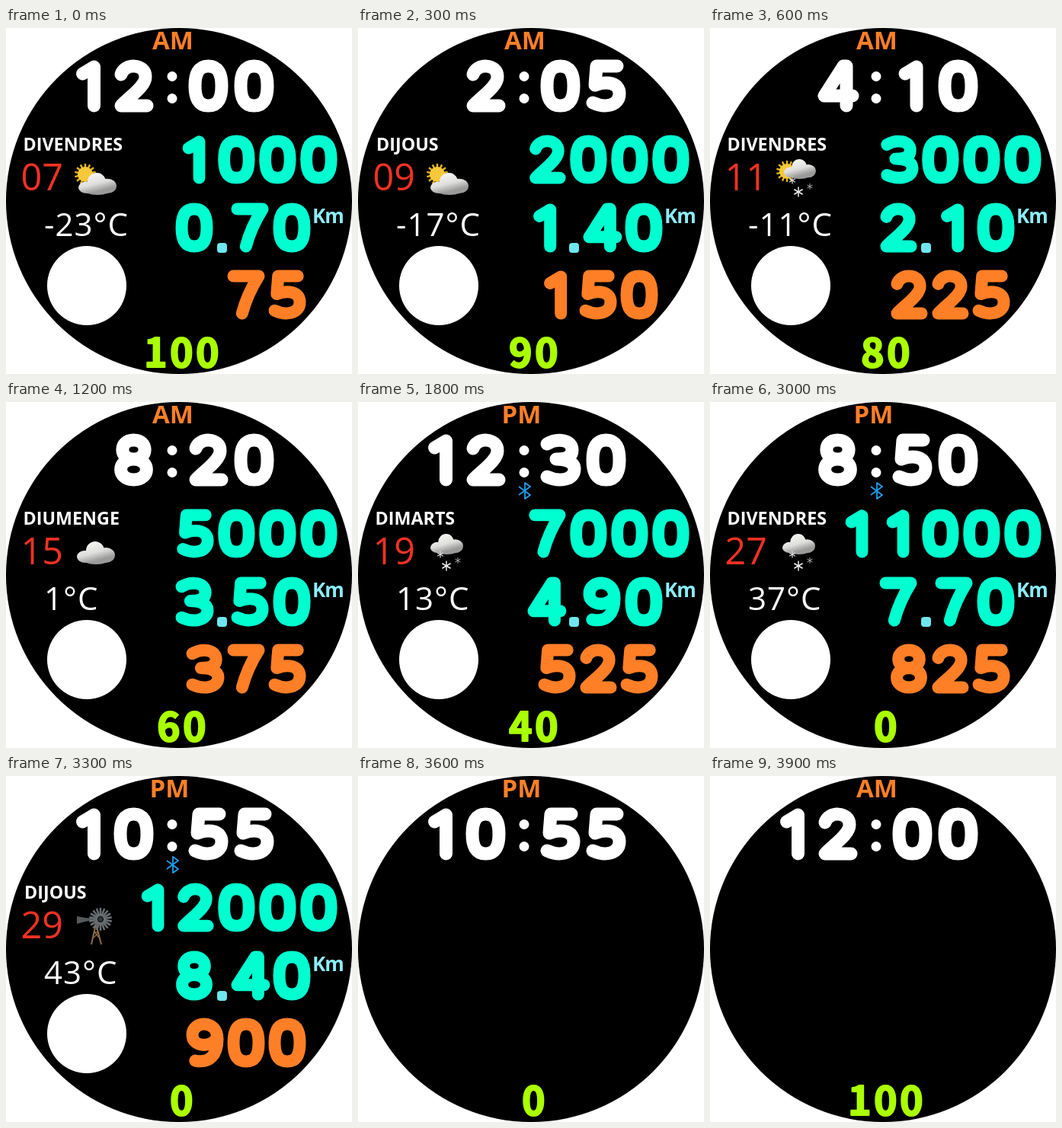
An HTML page with a canvas for the animation above (4200 ms loop, 454 px wide and 454 px high).

```html
<!DOCTYPE html>
<html lang="ca">
<head>
<meta charset="utf-8">
<title>Watch face</title>
<style>
html, body { margin: 0; height: 100%; overflow: hidden; background: #fff; }
canvas { display: block; width: 100vw; height: 100vh; }
</style>
</head>
<body>
<canvas id="face" width="454" height="454"></canvas>
<script>
const c = document.getElementById('face').getContext('2d');
const STEP = 300, COUNT = 14;
const TEAL = '#00ffd0', ORANGE = '#ff7f27', LIME = '#aaff00', ICE = '#8cecf5';

// Centre lines of the round digits in a 53 x 70 box
const digits = [
  'M26.5 9C13 9 9 20 9 35S13 61 26.5 61S44 50 44 35S40 9 26.5 9Z',
  'M17 19L32 10V61',
  'M10 20C14 5 42 5 42 23C42 36 22 48 10 61H44',
  'M9 14C22 6 42 8 42 22C42 32 32 34 21 34C32 34 45 37 45 47C45 62 24 64 9 57',
  'M38 61V9H34L9 48H46',
  'M41 9H14L12 34C28 28 44 31 44 45C44 62 24 64 9 57',
  'M40 10C20 6 9 18 9 40C9 68 44 66 44 46C44 28 16 28 10 42',
  'M9 9H44C34 25 26 42 21 61',
  'M26.5 34C7 34 7 9 26.5 9S46 34 26.5 34C4 34 4 61 26.5 61S49 34 26.5 34Z',
  'M13 60C33 64 44 52 44 30C44 2 9 4 9 24C9 42 37 42 43 28'
].map(d => new Path2D(d));

const days = ['DIVENDRES', 'DIJOUS', 'DIVENDRES', 'DISSABTE', 'DIUMENGE', 'DILLUNS',
  'DIMARTS', 'DIMECRES', 'DIVENDRES', 'DIVENDRES', 'DIVENDRES', 'DIJOUS'];

function digit(d, x, y, h, color) {
  c.save();
  c.translate(x, y);
  c.scale(h / 70, h / 70);
  c.strokeStyle = color;
  c.lineWidth = 17;
  c.lineCap = c.lineJoin = 'round';
  c.stroke(digits[d]);
  c.restore();
}

function number(value, right, y, h, pitch, color) {
  const s = String(value), w = h * 53 / 70;
  [...s].forEach((d, i) => digit(d, right - w - (s.length - 1 - i) * pitch, y, h, color));
}

function text(s, x, y, size, weight, color, spacing = 0, family = 'Open Sans') {
  c.font = `${weight} ${size}px "${family}", sans-serif`;
  c.letterSpacing = spacing + 'px';
  c.fillStyle = color;
  c.fillText(s, x, y);
}

function disc(x, y, r, color) {
  c.fillStyle = color;
  c.beginPath();
  c.arc(x, y, r, 0, 7);
  c.fill();
}

function line(color, width, ...points) {
  c.strokeStyle = color;
  c.lineWidth = width;
  c.beginPath();
  points.forEach(p => c.lineTo(...p));
  c.stroke();
}

// n lines running outwards from a centre
function spokes(x, y, r0, r1, n, color, width) {
  for (let i = 0; i < n; i++) {
    const a = (i + 0.5) * 2 * Math.PI / n, u = Math.cos(a), v = Math.sin(a);
    line(color, width, [x + r0 * u, y + r0 * v], [x + r1 * u, y + r1 * v]);
  }
}

function sun(x, y) {
  spokes(x, y, 8, 14, 14, '#e6b422', 2.4);
  disc(x, y, 10, '#f7c93a');
}

function cloud(x, y, w, h) {
  c.save();
  c.translate(x, y);
  c.scale(w / 50, h / 30);
  const g = c.createLinearGradient(0, 0, 8, 30);
  g.addColorStop(0, '#fff');
  g.addColorStop(0.65, '#dededc');
  g.addColorStop(1, '#9a9a98');
  c.fillStyle = g;
  c.beginPath();
  for (const [cx, cy, rx, ry] of [[11, 20, 11, 8], [24, 12, 12, 12], [38, 18, 12, 10], [25, 22, 19, 8]]) {
    c.moveTo(cx + rx, cy);
    c.ellipse(cx, cy, rx, ry, 0, 0, 2 * Math.PI);
  }
  c.fill();
  c.restore();
}

function snow() {
  spokes(108, 200, 0, 4.5, 6, '#ddd', 1.2);
  spokes(116, 215, 0, 6.5, 6, '#eee', 1.5);
  spokes(131, 208, 0, 4, 6, '#aaa', 1);
}

function windmill() {
  line('#8a6a4a', 2, [112, 221], [118, 194], [125, 221]);
  line('#8a6a4a', 1.3, [114, 213], [122, 205], [116, 205], [124, 214]);
  c.fillStyle = '#55595c';
  c.beginPath();
  for (const p of [[93, 184], [104, 186], [121, 188], [104, 191], [93, 194]]) c.lineTo(...p);
  c.fill();
  spokes(124, 188, 4, 15, 18, '#686d70', 2.6);
  disc(124, 188, 3, '#33373a');
}

function weather(k) {
  if (k < 2) {
    sun(104, 192);
    cloud(95, 190, 50, 29);
  } else if (k < 4) {
    sun(101, 188);
    cloud(97, 172, 42, 26);
    snow();
  } else if (k < 6) {
    cloud(93, 183, 50, 30);
  } else if (k < 11) {
    cloud(95, 173, 43, 27);
    snow();
  } else {
    windmill();
  }
}

function battery(level) {
  c.textAlign = 'center';
  text(level, 232, 445, 52, 700, LIME, 3.3, 'Noto Sans CJK JP');
  c.strokeStyle = LIME;
  c.lineWidth = 2;
  c.lineJoin = 'round';
  c.strokeText(level, 232, 445);
  c.textAlign = 'left';
}

function clock(k) {
  const mins = k * 125, hour = Math.floor(mins / 60), h = hour % 12 || 12, m = mins % 60;
  if (hour < 12) text('AM', 192, 28, 33, 700, ORANGE);
  else text('PM', 188.5, 28, 33, 700, ORANGE);
  number(h, 194, 41, 70, 57.5, '#fff');
  number(String(m).padStart(2, '0'), 352, 41, 70, 60, '#fff');
  disc(218, 63.5, 6.5, '#fff');
  disc(218, 92.5, 6.5, '#fff');
  battery(Math.max(0, 100 - 10 * k));
}

function details(k) {
  const n = k + 1;
  if (k > 5) line('#1e9ff0', 1.8, [211, 111], [226, 122], [219, 127], [219, 106], [226, 111], [211, 122]);

  text(days[k], days[k] == 'DIJOUS' ? 24 : 22.5, 161, 23.3, 700, '#fff');
  text(String(7 + 2 * k).padStart(2, '0'), 19.5, 212.5, 48.5, 500, '#f03224');
  weather(k);
  text(6 * k - 23 + '°C', 50, 272.5, 42, 400, '#fff', 1);
  disc(106, 338, 52, '#fff');

  number(1000 * n, 435, 140, 65, 54, TEAL);
  const [km, part] = (0.7 * n).toFixed(2).split('.');
  number(km, 272, 229, 66, 54, TEAL);
  number(part, 400, 229, 66, 55, TEAL);
  c.fillStyle = '#70e6ee';
  c.beginPath();
  c.roundRect(277, 282, 13, 13, 4);
  c.fill();
  text('Km', 402, 256, 26, 700, ICE, -1);
  number(75 * n, 394, 317, 66, 54, ORANGE);
}

function draw(now) {
  const k = Math.floor(now / STEP) % COUNT;
  c.fillStyle = '#fff';
  c.fillRect(0, 0, 454, 454);
  disc(227, 227, 227, '#000');
  // The last two steps are the dimmed face: clock and battery only
  clock(k == 13 ? 0 : Math.min(k, 11));
  if (k < 12) details(k);
}

const start = performance.now();
function tick() {
  draw(performance.now() - start);
  requestAnimationFrame(tick);
}
tick();
</script>
</body>
</html>
```
